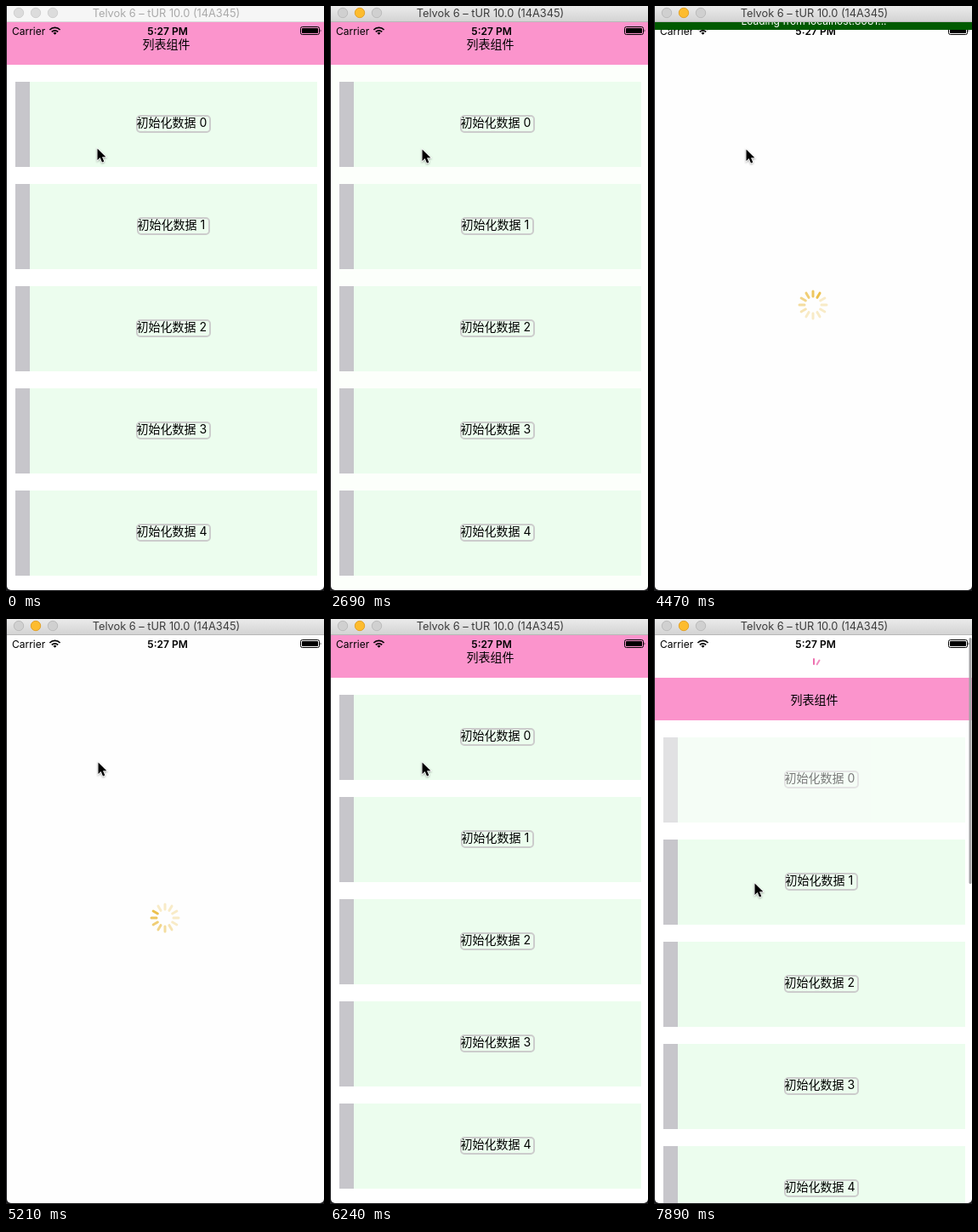
These frames come from a looping animation (374 px wide and 687 px high, 8000 ms). An HTML page:

```html
<!DOCTYPE html>
<html lang="zh">
<head>
<meta charset="utf-8">
<title>列表组件</title>
<style>
  html, body { margin: 0; width: 100%; height: 100%; overflow: hidden; background: #1d1d1f; }
  svg { display: block; }
  text { font-family: Inter, "Noto Sans CJK SC", "Noto Sans CJK", sans-serif; }
  .mid { text-anchor: middle; }
  .label { font-size: 14px; }
  .small { font-size: 12px; }
</style>
</head>
<body>
<svg width="374" height="687" viewBox="0 0 374 687">
  <defs>
    <clipPath id="frame"><rect x="1" y="-10" width="373" height="696" rx="5"/></clipPath>
    <linearGradient id="active" x2="0" y2="1">
      <stop stop-color="#ebebeb"/><stop offset="1" stop-color="#d2d2d2"/>
    </linearGradient>
  </defs>
  <g clip-path="url(#frame)">
    <rect id="page" x="1" width="373" height="687" fill="#fff"/>

    <g id="list">
      <rect x="1" y="19" width="373" height="50" fill="#fb94cc"/>
      <text class="label mid" x="188.5" y="50">列表组件</text>
      <g id="items"></g>
    </g>
    <g id="spinner" transform="translate(187 351)" stroke="#ecc04c" stroke-width="3" stroke-linecap="round"></g>
    <g id="pull" stroke="#ee6fb0" stroke-width="2" stroke-linecap="round">
      <path d="M188 47v6"/><path d="M194.500 48.500l-2.800 4.800" opacity=".8"/>
      <rect x="370.500" y="22" width="3" height="289" rx="1.500" fill="#a2a2a4" stroke="none"/>
    </g>

    <g id="status">
      <text class="small" x="7" y="33.500">Carrier</text>
      <g fill="none" stroke="#000" stroke-width="1.700">
        <path d="M51.400 28a8.600 8.600 0 0 1 12.200 0"/>
        <path d="M53.800 30.400a5.200 5.200 0 0 1 7.400 0"/>
        <path d="M55.500 31.800a2.800 2.800 0 0 1 4 0l-2 2z" fill="#000" stroke="none"/>
      </g>
      <text class="small mid" x="190" y="33.500" font-weight="600">5:27 PM</text>
      <rect x="346.500" y="24.500" width="22" height="9" rx="2" fill="none" stroke="#000"/>
      <rect x="348" y="26" width="19" height="6" rx=".8"/>
      <path d="M369.700 27.300q1.600 1.700 0 3.400z"/>
    </g>

    <g id="loading">
      <rect x="1" y="19" width="373" height="22" fill="#005a00"/>
      <text class="small mid" x="188" y="34.500" fill="#fff">Loading from localhost:8081...</text>
    </g>

    <rect id="bar" x="1" width="373" height="19"/>
    <rect id="barLine" x="1" y="18" width="373" height="1"/>
    <g id="lights"></g>
    <text id="caption" class="mid" x="188.500" y="13" font-size="12.800">Telvok 6 – tUR 10.0 (14A345)</text>
  </g>
  <path id="cursor" d="M0 0v13.600l3.200-3 2.300 5.400 2.300-1-2.300-5.200h4.400z" stroke="#fff" stroke-width="1.400" paint-order="stroke"
    style="filter:drop-shadow(0 1px 1px #0005)"/>
</svg>
<script>
const LOOP = 8000;
const $ = id => document.getElementById(id);
const show = (id, on) => { $(id).style.display = on ? "" : "none"; };

// cursor: [start, x, y]
const cursorStops = [[0, 107.5, 167.5], [150, 108.5, 168.5], [6990, 124.5, 147.5], [7140, 125.5, 142.5], [7890, 118.5, 310.5]];
// moments at which the activity spinner is redrawn
const ticks = [4180, 4320, 4470, 4620, 4760, 4910, 5060, 5210, 5360, 5500, 5650, 5800, 5940, 6090];

$("items").innerHTML = [0, 1, 2, 3, 4].map(i => {
  const inset = i === 1 ? 1 : 0;
  return `<g transform="translate(0 ${89 + 120 * i})">
    <rect x="11" width="355" height="100" fill="#ecfdee"/>
    <rect x="11" width="17" height="100" fill="#c7c6cb"/>
    <rect x="${154 + inset}" y="40" width="${86 - 2 * inset}" height="19" rx="4" fill="none" stroke="#ccc" stroke-width="2"/>
    <text class="label" x="${153.5 + inset}" y="53">初始化数据 ${i}</text></g>`;
}).join("");

$("lights").innerHTML = [15, 35, 55].map(x =>
  `<circle cx="${x}" cy="8" r="5.700"/>`).join("");

$("spinner").innerHTML = Array.from({ length: 12 }, (_, i) =>
  `<path d="M0 -10v-6" transform="rotate(${i * 30})"/>`).join("");

const firstItem = $("items").firstElementChild;
const lights = [...$("lights").children];
const spokes = [...$("spinner").children];
const last = (list, test) => list.filter(test).pop();

function drawWindow(focused) {
  $("bar").setAttribute("fill", focused ? "url(#active)" : "#f6f6f6");
  $("barLine").setAttribute("fill", focused ? "#b8b8b8" : "#dadada");
  $("caption").setAttribute("fill", focused ? "#3c3c3c" : "#a9a9a9");
  lights.forEach((light, i) => {
    const yellow = focused && i === 1;
    light.setAttribute("fill", yellow ? "#fdbc2e" : focused ? "#d0d0d0" : "#dcdcdc");
    light.setAttribute("stroke", yellow ? "#e2a22a" : focused ? "#bcbcbc" : "#d0d0d0");
  });
}

function drawSpinner(t) {
  const tick = last(ticks, s => s <= t);
  const head = 1 + Math.floor((tick - 4470) * 0.012 + 0.47);
  spokes.forEach((spoke, i) => {
    const age = (((head - i) % 12) + 12) % 12;
    spoke.setAttribute("opacity", Math.max(0.3, 1 - age * 0.118));
  });
}

function draw(t) {
  const reloading = t >= 3880 && t < 6240;
  const spinning = t >= 4180 && t < 6240;
  const pulled = t >= 7890;
  const pressed = (t >= 2540 && t < 2690) || (t >= 7740 && t < 7890);

  drawWindow(t >= 2540);
  $("page").setAttribute("fill", t >= 2540 && t < 3880 ? "#fcfffb" : reloading ? "#fefefe" : "#fff");
  show("list", !reloading);
  $("list").setAttribute("transform", `translate(0 ${pulled ? 50 : 0})`);
  firstItem.setAttribute("opacity", pulled ? 0.52 : pressed ? 0.88 : 1);
  show("pull", pulled);

  show("loading", t >= 3880 && t < 4620);
  $("loading").setAttribute("transform", `translate(0 ${t >= 4470 ? -13 : 0})`);
  show("spinner", spinning);
  if (spinning) drawSpinner(t);

  const [, x, y] = last(cursorStops, stop => stop[0] <= t);
  $("cursor").setAttribute("transform", `translate(${x} ${y})`);
}

function frame() {
  draw(performance.now() % LOOP);
  requestAnimationFrame(frame);
}
frame();
</script>
</body>
</html>
```
